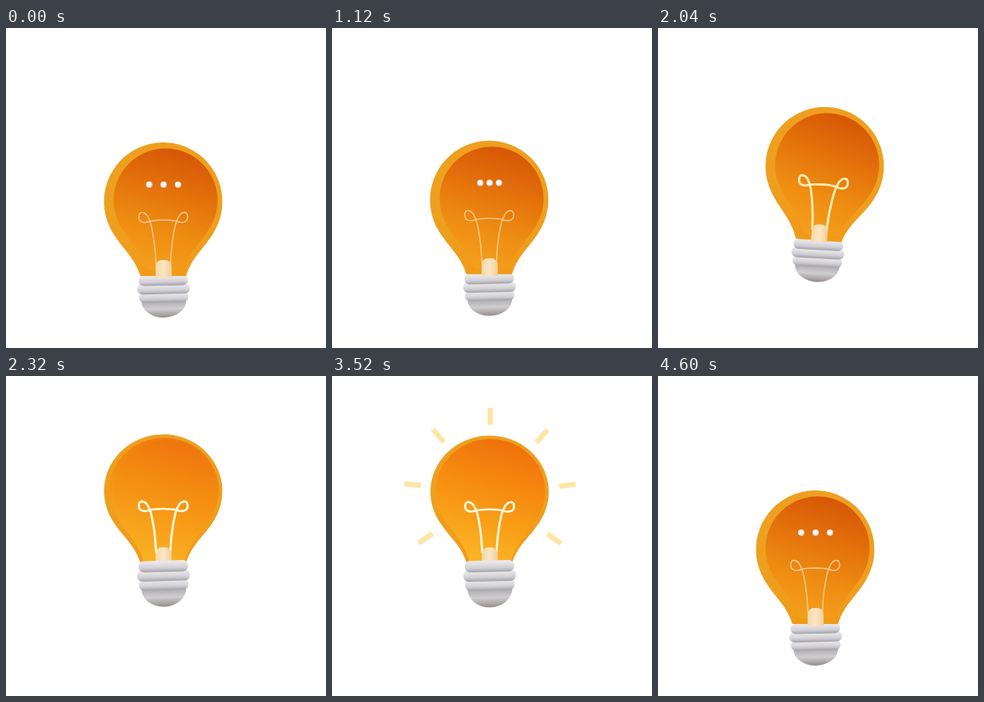
An HTML page with a canvas for the animation above (4.64 s loop, 400 px wide and 400 px high).

```html
<!DOCTYPE html>
<html lang="en">
<head>
<meta charset="utf-8">
<title>Light bulb</title>
<style>
  html, body { margin: 0; width: 100%; height: 100%; overflow: hidden; background: #fff; }
  canvas { display: block; width: 400px; height: 400px; }
</style>
</head>
<body>
<canvas id="stage" width="400" height="400"></canvas>
<script>
const ctx = document.getElementById('stage').getContext('2d');
const LOOP = 4640, STEP = 40, { PI, sin, cos } = Math;

const unit = (t, a, b) => Math.min(1, Math.max(0, (t - a) / (b - a)));
const ramp = (t, a, b) => { const u = unit(t, a, b); return u * u * (3 - 2 * u); };
const bump = (t, a, b) => sin(PI * unit(t, a, b)) ** 2;

// Creep up, leap, hover, then fall back to rest.
function height(t) {
  const hover = 5 * ramp(t, 2040, 2280) * cos(2 * PI * (t - 2200) / 1200);
  return (12 * ramp(t, 900, 1720) + 54 * ramp(t, 1720, 2280) + hover) * (1 - ramp(t, 3460, 4140));
}

// Degrees: lean back, swing forward, and lean again on the way down.
const tilt = t => -2.8 * bump(t, 1680, 1960) + 4.7 * bump(t, 1880, 2200) + 2.3 * bump(t, 3440, 4280);

// 1 while the bulb shines and faces the viewer.
const shine = t => ramp(t, 2080, 2440) * (1 - ramp(t, 3440, 3840));

const hop = t => {
  const u = unit(t, 0, 690);
  return -22.5 * sin(2 * PI * u) * sin(PI * u);
};

function vertical(top, bottom, ...colors) {
  return blend(0, top, 0, bottom, colors);
}

function blend(x0, y0, x1, y1, colors) {
  const g = ctx.createLinearGradient(x0, y0, x1, y1);
  colors.forEach((color, i) => g.addColorStop(i / (colors.length - 1), color));
  return g;
}

// A round globe that narrows into a neck, symmetric about cx.
function globe(cx, cy, r, waist, foot, bottom) {
  const path = new Path2D(), open = PI / 6;
  const sideX = r * cos(open), sideY = cy + r * sin(open);
  const pullX = sideX - .18 * r, pullY = sideY + .31 * r;
  path.moveTo(cx - foot, bottom);
  path.bezierCurveTo(cx - waist, bottom - 25, cx - pullX, pullY, cx - sideX, sideY);
  path.arc(cx, cy, r, PI - open, open);
  path.bezierCurveTo(cx + pullX, pullY, cx + waist, bottom - 25, cx + foot, bottom);
  path.closePath();
  return path;
}

const shell = globe(196.5, 217, 74, 36.5, 28.5, 310);
const hollow = globe(199.5, 215.5, 65, 31, 21, 303);
hollow.rect(187, 302, 22, 8);
const wideHollow = globe(197.5, 216, 68.5, 33, 26, 308);

// Left half of the wire as offsets from its axis: stem, loop, crossbar.
const halfWire = [[-9, 296], [-10, 276], [-14, 250], [-17, 240], [-22, 231], [-30, 230], [-31, 240], [-24, 244], [-12, 240]];

function smoothPath(points) {
  const path = new Path2D();
  path.moveTo(...points[0]);
  points.slice(1, -1).forEach(([x, y], i) => {
    const [nx, ny] = points[i + 2];
    path.quadraticCurveTo(x, y, (x + nx) / 2, (y + ny) / 2);
  });
  path.lineTo(...points[points.length - 1]);
  return path;
}

const AXIS = 196.5, WIRE_LENGTH = 222;
const wire = smoothPath([
  ...halfWire.map(([x, y]) => [AXIS + x, y]),
  ...halfWire.map(([x, y]) => [AXIS - x, y]).reverse()
]);

function strokeWire(color, width, alpha = 1, reach = 1) {
  ctx.globalAlpha = alpha;
  ctx.strokeStyle = color;
  ctx.lineWidth = width;
  ctx.lineCap = 'round';
  ctx.setLineDash(reach < 1 ? [WIRE_LENGTH * reach, 1000] : []);
  ctx.stroke(wire);
  ctx.setLineDash([]);
  ctx.globalAlpha = 1;
}

function drawRays(t) {
  const inner = 87, outer = inner + 21 * ramp(t, 2300, 2560);
  ctx.globalAlpha = .85 * ramp(t, 2300, 2480) * (1 - ramp(t, 3440, 3900));
  ctx.strokeStyle = '#fcdf8c';
  ctx.lineWidth = 6.5;
  ctx.lineCap = 'butt';
  for (let i = -3; i <= 3; i++) {
    const angle = i * 41.5 * PI / 180, x = sin(angle), y = -cos(angle);
    ctx.beginPath();
    ctx.moveTo(197 + inner * x, 216.5 + inner * y);
    ctx.lineTo(197 + outer * x, 216.5 + outer * y);
    ctx.stroke();
  }
  ctx.globalAlpha = 1;
}

function drawBase(p) {
  ctx.save();
  ctx.translate(196.5, 310 - 11 * p);
  ctx.scale(1, 1 + .12 * p);
  ctx.rotate(-.025);
  ctx.fillStyle = vertical(30, 52, '#a9a7a9', '#cfcdcf', '#958d8b');
  ctx.beginPath();
  ctx.ellipse(0, 31, 28, 21, 0, 0, PI);
  ctx.fill();
  for (let i = 2; i >= 0; i--) {
    const half = 33 - 2 * (i - 1) ** 2, top = 10.5 * i - 1;
    ctx.fillStyle = vertical(top, top + 13, '#ebebed', '#e0e0e3', '#cfced2', '#a3a1a5');
    ctx.beginPath();
    ctx.roundRect(-half, top, 2 * half, 13, 7);
    ctx.fill();
  }
  ctx.restore();
}

function drawHollow(path, alpha, colors) {
  ctx.globalAlpha = alpha;
  ctx.fillStyle = blend(222, 152, 176, 302, colors);
  ctx.fill(path);
  ctx.globalAlpha = 1;
}

function drawBulb(t, p) {
  ctx.save();
  ctx.translate(0, 143);
  ctx.scale(1, 1 - .055 * p);
  ctx.translate(0, -143);
  ctx.fillStyle = vertical(143, 310, '#ee9f1f', '#eda020', '#f19a18');
  ctx.fill(shell);
  drawHollow(hollow, 1 - p, ['#d65606', '#e3700a', '#ee8c12', '#f5a01c']);
  drawHollow(wideHollow, p, ['#f06c08', '#f6850d', '#fa9d15', '#fdb726']);

  strokeWire('#f8cf98', 1.4);
  const reach = .78 * unit(t, 1180, 1560) + .22 * unit(t, 1560, 1700);
  if (reach > 0) strokeWire(p > .5 ? '#fff6dc' : '#ffedb4', 2.8, 1 - ramp(t, 3960, 4320), reach);

  ctx.fillStyle = blend(187, 0, 207, 0, ['#f3d9aa', '#fae6c2', '#eed19d']);
  ctx.beginPath();
  ctx.roundRect(187, 290, 20, 22, [8, 8, 0, 0]);
  ctx.fill();
  ctx.restore();
}

function drawDots(t) {
  const spread = 18 * (1 - ramp(t, 960, 1360) + ramp(t, 4120, 4440));
  const radius = 4 * (1 - ramp(t, 1580, 1720) + ramp(t, 4080, 4320));
  for (let i = 0; i < 3; i++) {
    const x = 197 + (i - 1) * spread, y = 195.7 + hop(t - 70 * i);
    const shade = ctx.createRadialGradient(x - 1, y - 1, 0, x, y, 4);
    shade.addColorStop(.5, '#fbf9f8');
    shade.addColorStop(1, '#e3d8d5');
    ctx.fillStyle = shade;
    ctx.beginPath();
    ctx.arc(x, y, radius, 0, 2 * PI);
    ctx.fill();
  }
}

function draw(t) {
  const p = shine(t);
  ctx.fillStyle = '#fff';
  ctx.fillRect(0, 0, 400, 400);
  ctx.save();
  ctx.translate(196, 362 - height(t));
  ctx.rotate(tilt(t) * PI / 180);
  ctx.translate(-196, -362);
  drawRays(t);
  // The base hides the foot of the neck only while the bulb faces the viewer.
  if (p < .5) drawBase(p);
  drawBulb(t, p);
  if (p >= .5) drawBase(p);
  drawDots(t);
  ctx.restore();
}

const start = performance.now();
function frame() {
  const t = (performance.now() - start) % LOOP;
  draw(Math.floor(t / STEP) * STEP);
  requestAnimationFrame(frame);
}
frame();
</script>
</body>
</html>
```
